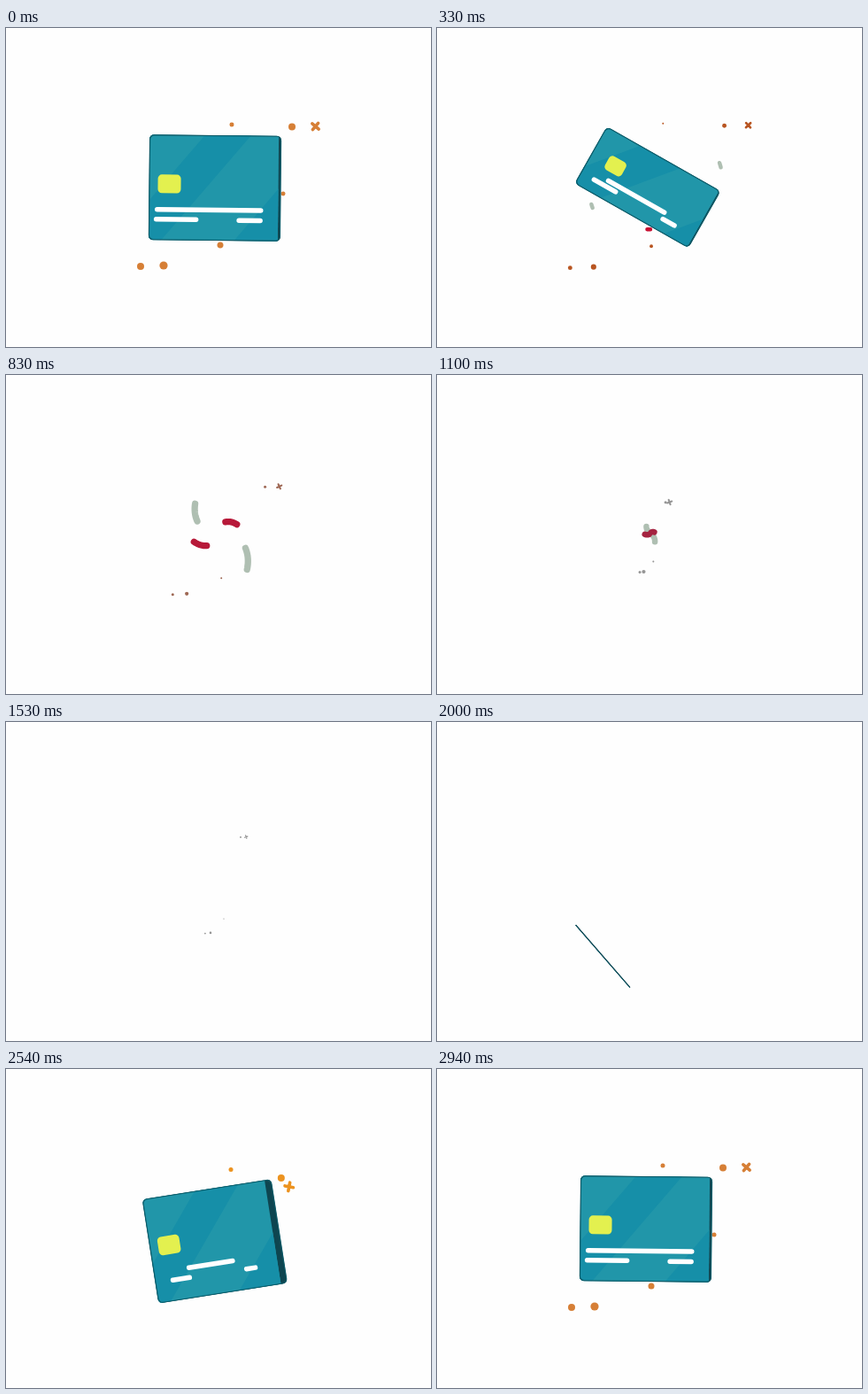
Recreate the animation shown at these times as an HTML page with a canvas. Size 480 px wide and 360 px high, loop 2.98 s.

```html
<!DOCTYPE html>
<html lang="en">
<head>
<meta charset="utf-8">
<title>Spinning card</title>
<style>
  html, body { margin: 0; width: 100%; height: 100%; overflow: hidden; background: #fefefe; }
  canvas { display: block; }
</style>
</head>
<body>
<canvas id="stage" width="480" height="360"></canvas>
<script>
const ctx = document.getElementById('stage').getContext('2d');
const LOOP = 2980, ENTER = 2000, SETTLED = 2940, RAD = Math.PI / 180;

const mix = (a, b, u) => a + (b - a) * u;
const progress = (t, from, to) => Math.min(1, Math.max(0, (t - from) / (to - from)));
const smooth = (t, from, to) => {
  const u = progress(t, from, to);
  return u * u * (3 - 2 * u);
};
const easeOut = (u, power) => 1 - (1 - u) ** power;
const blend = (a, b, u) => a.map((v, i) => mix(v, b[i], u));
const rgb = color => `rgb(${color.map(Math.round).join()})`;

// The card spins and folds flat.
function leavingCard(t) {
  const fold = smooth(t, 0, 790), shrink = 1 - smooth(t, 560, 800);
  const w = (149 - 3 * fold) * shrink;
  const side = Math.max(0, w - 3 * (1 - fold));
  return {
    x: 236 + 5 * fold, y: 180.5 - 2 * fold, angle: .6 + 113 * smooth(t, 0, 1000),
    w, h: 119 * (1 - fold), side, front: side, grow: 1 - fold,
    chip: { x: 23 + 20 * fold, y: -4 + 3 * fold, w: 26 - 11 * fold, h: 21 - 8 * fold }
  };
}

// The card unfolds from a thin line while it swings upright.
function enteringCard(t) {
  const out = power => easeOut(progress(t, ENTER, SETTLED), power);
  return {
    x: mix(187, 236, out(7)), y: mix(264.5, 180.5, out(2.1)),
    angle: mix(-41, .6, smooth(t, ENTER, 2785)),
    w: mix(.8, 149, out(5.4)), h: mix(94, 119, out(7)),
    side: 146 * out(3.5), front: 146 * smooth(t, 2120, 2600), grow: smooth(t, 2230, 2900),
    chip: { x: 23, y: -4, w: 26, h: 21 }
  };
}

function fillBox(color, x, y, w, h, r = 0) {
  ctx.fillStyle = color;
  ctx.beginPath();
  ctx.roundRect(x, y, w, h, r);
  ctx.fill();
}

// Diagonal shade on the front, given by its ends on the top edge.
function shade(left, right) {
  ctx.fillStyle = '#168fa8';
  ctx.beginPath();
  ctx.moveTo(left, -60);
  ctx.lineTo(right, -60);
  ctx.lineTo(right - 101, 60);
  ctx.lineTo(left - 101, 60);
  ctx.fill();
}

// middle x, y and length of each printed line
const lines = [[68, 25, 117], [31, 36, 45], [114, 36.5, 24]];

function drawFront({ chip, grow, h }) {
  shade(63, 115);
  shade(197, 300);
  fillBox('#e3f04f', chip.x - chip.w / 2, chip.y - chip.h / 2, chip.w, chip.h, 4.5);
  if (grow <= 0) return;
  ctx.strokeStyle = '#fff';
  ctx.lineCap = 'round';
  ctx.lineWidth = Math.min(5.5, 3.8 + grow * 5);
  for (const [x, y, length] of lines) {
    const half = length * grow / 2;
    ctx.beginPath();
    ctx.moveTo(x - half, y * h / 119);
    ctx.lineTo(x + half, y * h / 119);
    ctx.stroke();
  }
}

function drawCard(card) {
  const { x, y, angle, w, h, side, front } = card;
  if (w <= 0 || h <= 0) return;
  const top = -h / 2, radius = Math.min(5, w / 2, h / 2);
  ctx.save();
  ctx.translate(x, y);
  ctx.rotate(angle * RAD);
  ctx.translate(-w / 2, 0);
  ctx.save();
  ctx.beginPath();
  ctx.roundRect(0, top, w, h, radius);
  ctx.clip();
  fillBox('#0e4550', 0, top, w, h);
  fillBox('#156878', 0, top, side, h);
  fillBox('#2196a9', 0, top, front, h);
  ctx.beginPath();
  ctx.rect(0, top, front, h);
  ctx.clip();
  ctx.scale(front / 146, 1);
  drawFront(card);
  ctx.restore();
  if (w > 3 && h > 3) {
    ctx.strokeStyle = '#0f5c69';
    ctx.lineWidth = 1.2;
    ctx.beginPath();
    ctx.roundRect(.5, top + .5, w - 1, h - 1, radius);
    ctx.stroke();
  }
  ctx.restore();
}

const ORANGE = [214, 127, 54], RUST = [165, 60, 20], BRIGHT = [236, 147, 32], GRAY = [150, 150, 150];
// x, y and radius at rest, in the order they fly out
const dots = [
  [255, 109, 2.5], [242, 245, 3.5], [323, 111.5, 4], [349.5, 111, 6],
  [313, 187, 2.5], [178, 268, 4.6], [152, 269, 4]
];
const CROSS = 3;

// Dots shrink, gather near the middle, then drift apart and vanish.
function leavingDot([x, y, r], t) {
  const shrink = smooth(t, 0, 570), gather = smooth(t, 570, 1100);
  const drift = 1 + .4 * smooth(t, 1100, 1600);
  const dx = x - 240, dy = y - 180, spread = 1 + .03 * shrink;
  return {
    x: 240 + mix(dx * spread, (4 + dx * .17) * drift, gather),
    y: 180 + mix(dy * spread, (dy * .5 - 2) * drift, gather),
    r: (r - 2.5 * shrink) * (1 - .4 * smooth(t, 1100, 1600)) * (1 - smooth(t, 1600, 1800)),
    turn: 40 + 30 * smooth(t, 0, 1100),
    color: blend(blend(ORANGE, RUST, shrink), GRAY, gather)
  };
}

// Dots shoot out one after another from behind the card.
function enteringDot([x, y, r], t, n, card) {
  const fly = easeOut(progress(t, 2010 + n * 115, SETTLED), 3.5);
  return {
    x: mix(card.x, x, fly), y: mix(card.y, y, fly),
    r: r * Math.min(1, fly * 1.4),
    turn: 40 - 110 * (1 - fly),
    color: blend(blend(GRAY, BRIGHT, smooth(t, 2300, 2540)), ORANGE, smooth(t, 2540, SETTLED))
  };
}

function drawDot({ x, y, r, turn, color }, isCross) {
  if (r <= .05) return;
  ctx.save();
  ctx.translate(x, y);
  ctx.fillStyle = ctx.strokeStyle = rgb(color);
  ctx.beginPath();
  if (isCross) {
    const arm = r * .8;
    ctx.rotate(turn * RAD);
    ctx.lineWidth = r * .6;
    ctx.lineCap = 'round';
    ctx.moveTo(-arm, 0);
    ctx.lineTo(arm, 0);
    ctx.moveTo(0, -arm);
    ctx.lineTo(0, arm);
    ctx.stroke();
  } else {
    ctx.arc(0, 0, r, 0, 7);
    ctx.fill();
  }
  ctx.restore();
}

// radius, start and end angle
const grayArcs = [[76, 200, 222], [90, 20.5, 43.7]];
const redArcs = [[39, -71, -36], [53, 127, 153]];

// Arcs grow around the spinning card, then spiral into the middle.
function drawArc([radius, from, to], color, t) {
  const grow = smooth(t, 250, 570), sink = smooth(t, 570, 1100);
  const scale = .9 + .1 * grow - .88 * sink, turn = 18 * sink - 70 * (1 - grow);
  ctx.strokeStyle = color;
  ctx.lineWidth = (8 - 1.5 * sink) * smooth(t, 250, 400) * (1 - smooth(t, 1100, 1200));
  ctx.lineCap = ctx.lineJoin = 'round';
  ctx.beginPath();
  for (let u = 0; u <= 1; u += 1 / 16) {
    const a = (to + turn - (to - from) * grow * u) * RAD;
    const r = radius * scale * (1 - .7 * sink * u);
    ctx.lineTo(241 + r * Math.cos(a), 178.8 + r * Math.sin(a));
  }
  ctx.stroke();
}

function draw(t) {
  ctx.fillStyle = '#fefefe';
  ctx.fillRect(0, 0, 480, 360);
  if (t > 250 && t < 1200) {
    const red = rgb(blend([200, 16, 50], [165, 35, 64], smooth(t, 570, 1100)));
    grayArcs.forEach(arc => drawArc(arc, '#afbfb2', t));
    redArcs.forEach(arc => drawArc(arc, red, t));
  }
  const entering = t >= ENTER;
  const card = entering ? enteringCard(t) : leavingCard(t);
  dots.forEach((dot, n) =>
    drawDot(entering ? enteringDot(dot, t, n, card) : leavingDot(dot, t), n === CROSS));
  drawCard(card);
}

const start = performance.now();
function tick() {
  draw((performance.now() - start) % LOOP);
  requestAnimationFrame(tick);
}
tick();
</script>
</body>
</html>
```
